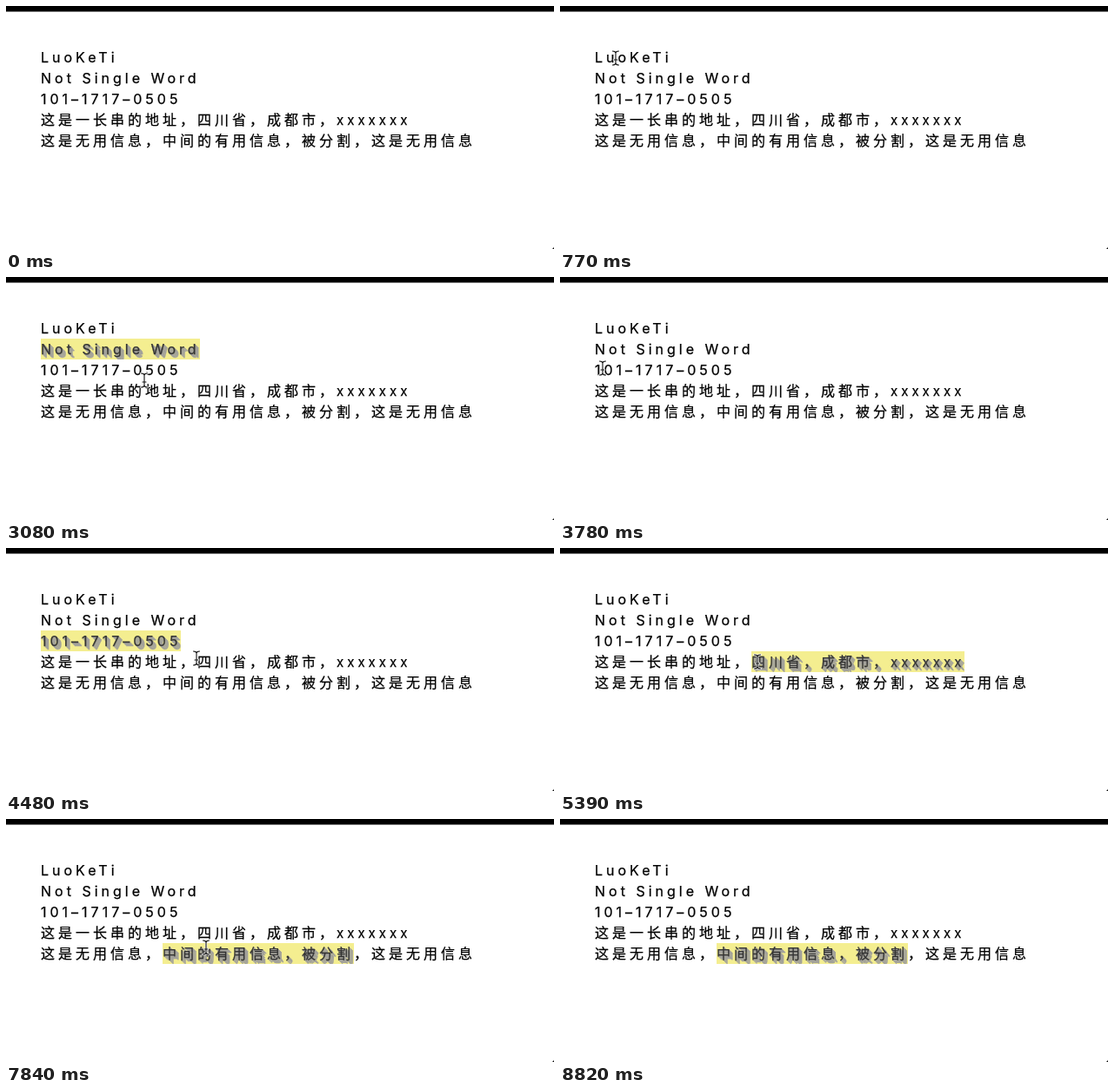
Write an HTML page that moves like this. It is 630 by 280 pixels and loops after 8.89 s.

```html
<!DOCTYPE html>
<html lang="zh-CN">
<head>
<meta charset="utf-8">
<style>
html, body { margin: 0; width: 100%; height: 100%; overflow: hidden; background: #fff; }
svg { display: block; }
text { font: 16px "Noto Sans CJK SC", "Noto Sans CJK", sans-serif; letter-spacing: 4px; white-space: pre; stroke-width: .25px; }
.latin, tspan { font-family: Inter, "Liberation Sans", sans-serif; }
tspan { font-size: 15px; }
</style>
</head>
<body>
<svg width="630" height="280" viewBox="0 0 630 280">
  <defs>
    <path id="beamShape" d="M-3.5 -8Q-.5 -8 0 -6Q.5 -8 3.5 -8M0 -6V6M-3.5 8Q-.5 8 0 6Q.5 8 3.5 8M-2 2H2"/>
  </defs>
  <rect width="630" height="280" fill="#fff"/>
  <rect width="630" height="6.5"/>
  <path d="M630 277.5V280H627.5Q629.5 279.5 630 277.5Z"/>
  <g id="lines"></g>
  <g id="marks"></g>
  <g id="cursor">
    <g id="beam" fill="none" stroke-linecap="round">
      <use href="#beamShape" stroke="#fff" stroke-width="2.6"/>
      <use href="#beamShape" stroke="#111" stroke-width="1.1"/>
    </g>
    <path id="arrow" d="M0 0V15L3.5 11.8L5.8 17L8.2 16L6 10.8H10.8Z" stroke="#fff"/>
  </g>
</svg>
<script>
const LOOP = 8890, STEP = 70, LEFT = 40, TOP = 47, LINE_HEIGHT = 24;
const byId = id => document.getElementById(id);

const name = "LuoKeTi", words = "Not Single Word", phone = "101–1717–0505";
const lines = [
  name, words, phone,
  "这是一长串的地址，四川省，成都市，<tspan>xxxxxxx</tspan>",
  "这是无用信息，中间的有用信息，被分割，这是无用信息"
];

const lineMarkup = (row, color, shift = 0) =>
  `<text class="${/^\w/.test(lines[row]) ? "latin" : ""}" x="${LEFT + shift}"
    y="${TOP + 18 + row * LINE_HEIGHT + shift}" fill="${color}" stroke="${color}">${lines[row]}</text>`;

byId("lines").innerHTML = lines.map((_, row) => lineMarkup(row, "#000")).join("");
const lineNodes = [...byId("lines").children];

// Which phrase is marked from each time on.
const selections = [
  [0, ""], [2520, words], [3780, ""], [3850, phone],
  [4970, "四川省，成都市，xxxxxxx"], [5950, ""], [6090, "的"],
  [7140, "中间的有用信息，被分割"]
];

// A nested svg clips the line and its stacked shadow to the phrase's box.
function markMarkup(phrase) {
  const row = lineNodes.findIndex(node => node.textContent.includes(phrase));
  const node = lineNodes[row], first = node.textContent.indexOf(phrase);
  const x = Math.round(node.getStartPositionOfChar(first).x);
  const y = TOP + row * LINE_HEIGHT;
  const width = Math.round(node.getSubStringLength(first, phrase.length));
  const shadow = [4, 3, 2, 1].map(shift => lineMarkup(row, "#a3a29b", shift)).join("");
  return `<svg x="${x}" y="${y}" width="${width}" height="${LINE_HEIGHT}"
    viewBox="${x} ${y} ${width} ${LINE_HEIGHT}" overflow="hidden">
    <rect x="${x}" y="${y}" width="${width}" height="${LINE_HEIGHT}" fill="#f4ee90"/>
    ${shadow}${lineMarkup(row, "#333")}</svg>`;
}
byId("marks").innerHTML = selections.map(([, phrase]) => phrase ? markMarkup(phrase) : "<g/>").join("");
const markNodes = [...byId("marks").children];

// The cursor eases to each stop in turn; bend bows the way there.
const entry = { x: 374, y: 249 };
const moves = [
  { from: 140, to: 910, x: 79, y: 60, bend: [-150, -60] },
  { from: 1400, to: 1610, x: 84, y: 68 },
  { from: 2100, to: 2170, x: 101, y: 66 },
  { from: 2170, to: 2450, x: 112, y: 84 },
  { from: 2800, to: 3360, x: 206, y: 124, bend: [0, 15] },
  { from: 3360, to: 3710, x: 49, y: 105 },
  { from: 3990, to: 4900, x: 230, y: 131, bend: [70, 8] },
  { from: 5320, to: 5880, x: 151, y: 131 },
  { from: 6440, to: 7000, x: 227, y: 147 },
  { from: 7800, to: 8330, x: 440, y: 233 },
  { from: 8400, to: 8680, x: 378, y: 281 }
];

const ease = k => k * k * (3 - 2 * k);

function cursorAt(time) {
  const i = moves.findLastIndex(move => move.from <= time);
  if (i < 0 || time >= moves.at(-1).to) return null;
  const { from, to, x, y, bend = [0, 0] } = moves[i];
  const start = moves[i - 1] || entry;
  const k = ease(Math.min(1, (time - from) / (to - from)));
  const bow = Math.sin(Math.PI * k);
  return [start.x + (x - start.x) * k + bend[0] * bow, start.y + (y - start.y) * k + bend[1] * bow];
}

const show = (node, visible) => node.setAttribute("visibility", visible ? "visible" : "hidden");

function draw(time) {
  const current = selections.findLastIndex(([from]) => from <= time);
  markNodes.forEach((node, i) => show(node, i === current));
  const point = cursorAt(time);
  const overText = point && point[1] < TOP + lines.length * LINE_HEIGHT;
  show(byId("beam"), overText);
  show(byId("arrow"), point && !overText);
  if (point) byId("cursor").setAttribute("transform", `translate(${point.map(Math.round)})`);
}

const began = performance.now();
function tick() {
  const time = (performance.now() - began) % LOOP;
  draw(Math.floor(time / STEP) * STEP);
  requestAnimationFrame(tick);
}
tick();
</script>
</body>
</html>
```
